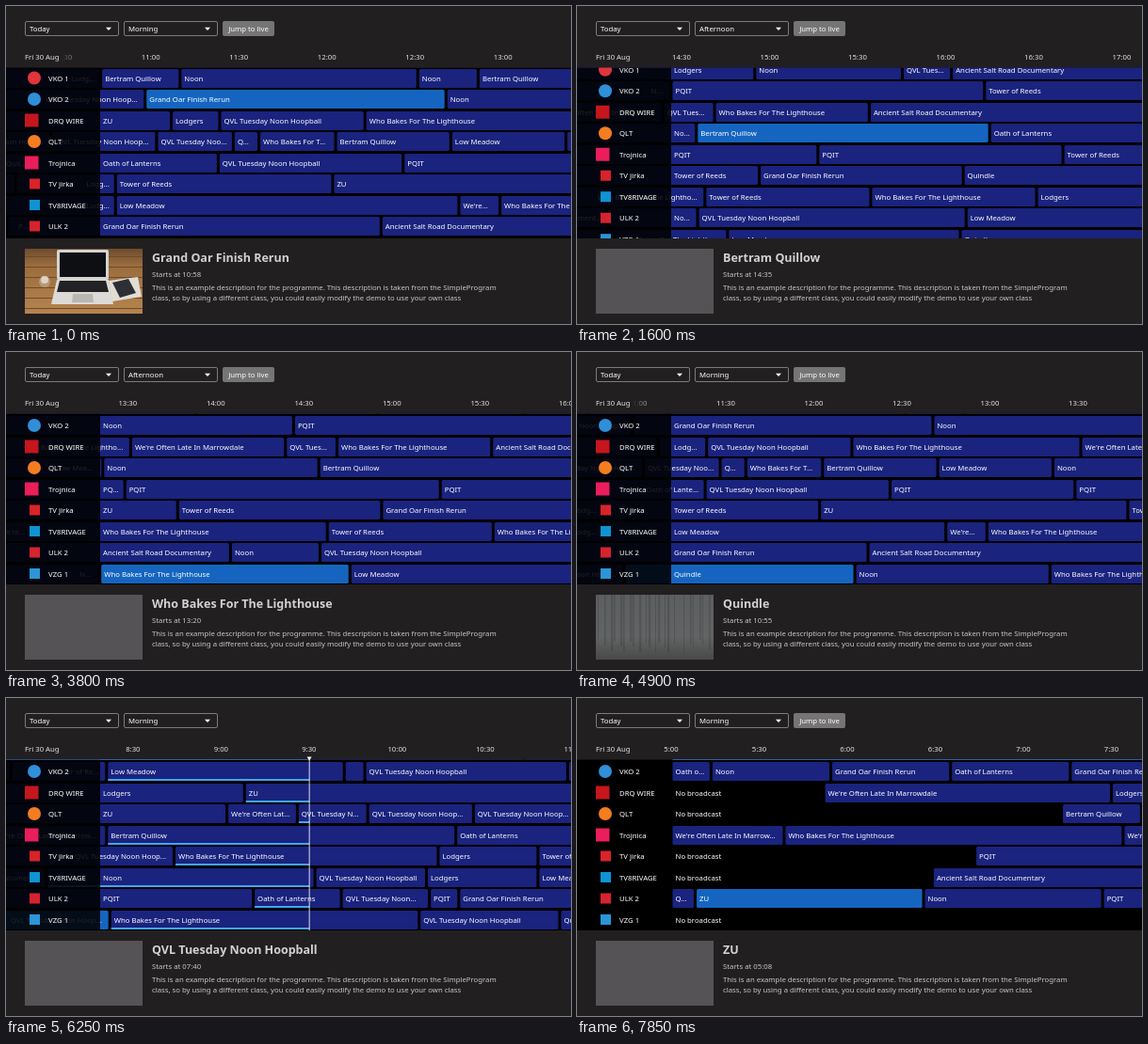
Write an HTML page with a canvas that moves like this. It is 600 by 338 pixels and loops after 8 s.

```html
<!DOCTYPE html>
<html lang="en">
<head>
<meta charset="utf-8">
<title>Programme guide</title>
<style>
html, body { margin: 0; width: 100%; height: 100%; overflow: hidden; background: #221f21; }
canvas { display: block; width: 600px; height: 338px; }
</style>
</head>
<body>
<canvas id="guide"></canvas>
<script>
const canvas = document.getElementById('guide');
const ctx = canvas.getContext('2d');
const dpr = window.devicePixelRatio || 1;
canvas.width = 600 * dpr;
canvas.height = 338 * dpr;

const LOOP = 8000, GLIDE = 600, SCALE = 187 / 60, LEFT = 100, TOP = 65.5, BOTTOM = 247;
const PITCH = 22.5, LIVE = 570.1, DAY_END = 1080, BG = '#221f21', SOFT = '#c8c8c8';
const FAMILY = '"Noto Sans", "Open Sans", sans-serif';
const FONT = '7.75px ' + FAMILY;

const NAMES = {
  s: 'Bertram Quillow', n: 'Noon', c: 'Grand Oar Finish Rerun', f: 'Lodgers',
  l: 'QVL Tuesday Noon Hoopball', m: 'Who Bakes For The Lighthouse', p: 'Low Meadow',
  t: 'Oath of Lanterns', i: 'PQIT', h: 'Tower of Reeds', w: 'Ancient Salt Road Documentary',
  a: "We're Often Late In Marrowdale", d: 'Quindle', e: 'ZU', x: 'No broadcast'
};

// A start minute followed by the shows that share the time up to the next one;
// a capital letter takes three times the share of a small one.
function schedule(plan) {
  const blocks = plan.split(' ').map(b => [parseFloat(b), b.replace(/[\d.]/g, '')]);
  return blocks.flatMap(([from, keys], i) => {
    const until = i + 1 < blocks.length ? blocks[i + 1][0] : DAY_END;
    const weights = [...keys].map(k => k < 'a' ? 3 : 1);
    const unit = (until - from) / weights.reduce((a, b) => a + b);
    let at = from;
    return weights.map((w, j) => {
      const start = at;
      at += w * unit;
      return { key: keys[j].toLowerCase(), start, end: at };
    });
  });
}

const CHANNELS = [
  ['VKO 1', 'circle', '#e0353a', '300f 643sN 751nSF 895Nl 962w'],
  ['VKO 2', 'circle', '#2f8fd8', '300tNCT 436ch 501p 582f 589l 658.1c 760.6n 866.5ih'],
  ['DRQ WIRE', 'big', '#c4161c', '300x 352af 548e 667fL 733m 811AlM 934w'],
  ['QLT', 'circle', '#f47d20', '300x 433sE 542al 590ll 662LlM 723sp 801.5n 875.1s 975tt'],
  ['Trojnica', 'big', '#e91e5a', '300aM 454a 501s 620tli 809i 916.5i 1000h'],
  ['TV jirka', 'small', '#d8232a', '300x 403.5il 524m 614f 648h 722e 827hc 966d'],
  ['TV8RIVAGE', 'small', '#1093d4', '300x 389wn 572lf 648p 765a 779m 878hm 991f'],
  ['ULK 2', 'small', '#d5232f', '300l 308.2e 386n 447i 551TLi 621c 738.5w 845nL 967p'],
  ['VZG 1', 'small', '#2a96d8', '300x 460l 502.1m 607.5l 655.4d 734n 800.5m 885.7p 965d']
].map(([name, logo, color, plan]) => ({ name, logo, color, shows: schedule(plan) }));

const KEYS = {
  right: [178, 850],
  down: [1250, 1540, 2100, 2350, 2500, 2600, 3050],
  left: [3270, 4110, 4654, 5130, 5620, 6235, 6700],
  up: [7800]
};

const clamp = v => Math.max(0, Math.min(1, v));
const easeOut = v => 1 - Math.pow(1 - clamp(v), 3);
const airing = (row, minute) => CHANNELS[row].shows.findIndex(s => s.start <= minute && s.end > minute);
const showOf = s => CHANNELS[s.row].shows[s.index];
const viewAt = (s, t) => s.from + (s.to - s.from) * easeOut((t - s.glide) / GLIDE);

// Left and right glide to the next show's start; up and down stay near the view's first third.
function buildStates() {
  let s = { time: 0, glide: 0, row: 1, index: airing(1, 700), from: 642.7 };
  s.to = showOf(s).start;
  const states = [s];
  const presses = Object.keys(KEYS).flatMap(dir => KEYS[dir].map(time => ({ dir, time })));
  presses.sort((a, b) => a.time - b.time);
  for (const { dir, time } of presses) {
    const next = { ...s, time };
    if (dir === 'up' || dir === 'down') {
      next.row += dir === 'up' ? -1 : 1;
      next.index = airing(next.row, s.to + 33);
    } else {
      next.index += dir === 'left' ? -1 : 1;
      next.from = viewAt(s, time);
      next.to = showOf(next).start;
      next.glide = time;
    }
    states.push(s = next);
  }
  return states;
}
const STATES = buildStates();

function rect(x, y, w, h, fill) {
  ctx.fillStyle = fill;
  ctx.fillRect(x, y, w, h);
}

function round(x, y, w, h, r, fill) {
  ctx.beginPath();
  ctx.roundRect(x, y, w, h, r);
  ctx.fillStyle = fill;
  ctx.fill();
}

function poly(fill, ...pts) {
  ctx.beginPath();
  for (let i = 0; i < pts.length; i += 2) ctx.lineTo(pts[i], pts[i + 1]);
  ctx.fillStyle = fill;
  ctx.fill();
}

function circle(x, y, r, fill) {
  ctx.beginPath();
  ctx.arc(x, y, r, 0, Math.PI * 2);
  ctx.fillStyle = fill;
  ctx.fill();
}

function text(s, x, y, color = '#fff', align = 'left', font = FONT) {
  ctx.font = font;
  ctx.fillStyle = color;
  ctx.textAlign = align;
  ctx.fillText(s, x, y);
}

function fit(s, room) {
  if (ctx.measureText(s).width <= room) return s;
  if (room < 12) return '';
  while (s && ctx.measureText(s + '...').width > room) s = s.slice(0, -1);
  return s.trimEnd() + '...';
}

const two = v => String(Math.floor(v)).padStart(2, '0');
const clock = min => Math.floor(min / 60) + ':' + two(min % 60);

function dropdown(x, label) {
  ctx.beginPath();
  ctx.roundRect(x + .5, 16.5, 99, 15, 1.5);
  ctx.strokeStyle = '#7d7b7d';
  ctx.lineWidth = 1;
  ctx.stroke();
  text(label, x + 5, 27);
  poly('#fff', x + 86, 22.7, x + 92, 22.7, x + 89, 26);
}

function drawHeader(now, liveX) {
  for (let m = Math.ceil((now - 40) / 30) * 30; m < now + 175; m += 30)
    text(clock(m), LEFT + (m - now) * SCALE, 57, '#e4e4e4', 'center');
  const fade = ctx.createLinearGradient(58, 0, 82, 0);
  fade.addColorStop(0, BG);
  fade.addColorStop(1, 'rgba(34,31,33,0)');
  rect(0, 46, 82, 16, fade);
  text('Fri 30 Aug', 20, 57, '#e4e4e4');
  dropdown(20, 'Today');
  dropdown(125, now < 720 ? 'Morning' : 'Afternoon');
  if (liveX < LEFT || liveX > 600) {
    round(230, 16, 55, 16, 2, '#757575');
    text('Jump to live', 257.5, 27, '#fff', 'center');
  }
}

function drawShow(show, y, now, focused) {
  const l = LEFT + (show.start - now) * SCALE + 1.5;
  const r = LEFT + (show.end - now) * SCALE - 1.5;
  if (r < -5 || l > 600) return;
  const name = NAMES[show.key], top = Math.round(y - 10);
  ctx.font = FONT;
  if (show.key !== 'x') round(l, top, r - l, 20, 1.5, focused ? '#1565c0' : '#1a237e');
  if (show.start < LIVE && show.end > LIVE)
    rect(l, top + 18, (LIVE - show.start) * SCALE - 1.5, 2, '#42a5f5');
  // the label stays beside the channel column until its show runs out
  const x = Math.max(l + 3, Math.min(103, r - ctx.measureText(name).width));
  text(fit(name, r - x - 5), x, top + 12.8);
}

function drawLogo(ch, y) {
  if (ch.logo === 'circle') circle(30, y, 7, ch.color);
  else if (ch.logo === 'big') rect(20, y - 7, 14.5, 14, ch.color);
  else rect(25, y - 5.5, 11, 11, ch.color);
}

function drawGrid(t, now, focus, liveX) {
  const shift = 21 * easeOut((t - 1540) / 370);
  const rowY = i => 76.5 + i * PITCH - shift;
  const height = BOTTOM - TOP;
  ctx.save();
  ctx.beginPath();
  ctx.rect(0, TOP, 600, height);
  ctx.clip();
  rect(0, TOP, 600, height, '#000');
  CHANNELS.forEach((ch, i) => ch.shows.forEach(s => drawShow(s, rowY(i), now, s === focus)));
  rect(0, TOP, LEFT, height, 'rgba(0,0,0,.87)');
  CHANNELS.forEach((ch, i) => {
    drawLogo(ch, rowY(i));
    text(ch.name, 45, Math.round(rowY(i) - 10) + 12.8);
  });
  ctx.restore();
  if (liveX >= LEFT && liveX <= 600) {
    rect(liveX - .5, TOP, 1, height, 'rgba(255,255,255,.85)');
    poly('#fff', liveX - 2.5, 62.5, liveX + 2.5, 62.5, liveX, 66.5);
  }
}

function drawDesk() {
  const wood = ctx.createLinearGradient(0, 258, 0, 327);
  wood.addColorStop(0, '#6d4c2e');
  wood.addColorStop(.25, '#9a6c3d');
  wood.addColorStop(1, '#b58450');
  rect(20, 258, 125, 69, wood);
  for (let i = 0; i < 6; i++) rect(20, 266 + i * 11, 125, 1, '#6f4a28');
  round(54, 259, 55, 32, 2, '#d4d4d4');
  rect(57, 262, 49, 26, '#0e0f12');
  poly('#dcdad6', 54, 291, 109, 291, 114, 317, 48, 317);
  poly('#222224', 57, 292, 106, 292, 109, 304, 54, 304);
  poly('#bab7b2', 71, 306, 92, 306, 93, 315, 70, 315);
  circle(41, 293, 6, '#b59a78');
  circle(41, 291, 4, '#ded2c2');
  poly('#e2ddd3', 109, 292, 140, 288, 144, 309, 113, 314);
  poly('#2c2f35', 113, 294, 130, 290, 138, 305, 121, 310);
}

function drawForest(alpha) {
  ctx.save();
  ctx.globalAlpha = alpha;
  const fog = ctx.createLinearGradient(0, 258, 0, 327);
  fog.addColorStop(0, '#5f6263');
  fog.addColorStop(.65, '#666868');
  fog.addColorStop(1, '#454646');
  rect(20, 258, 125, 69, fog);
  for (let i = 0; i < 22; i++)
    rect(22 + i * 37 % 121, 258, 1 + i % 3 * .6, 48 + i * 7 % 16, 'rgba(55,58,58,.45)');
  ctx.restore();
}

function drawInfo(t, show) {
  rect(20, 258, 125, 69, '#555355');
  if (t < KEYS.right[0]) drawDesk();
  if (show.key === 'd') drawForest(clamp((t - 4700) / 260));
  text(NAMES[show.key], 155, 272, '#d2d2d2', 'left', 'bold 12.5px ' + FAMILY);
  text('Starts at ' + two(show.start / 60) + ':' + two(show.start % 60), 155, 288, SOFT);
  text('This is an example description for the programme. This description is taken from the SimpleProgram', 155, 302, SOFT);
  text('class, so by using a different class, you could easily modify the demo to use your own class', 155, 313, SOFT);
}

function draw(t) {
  ctx.setTransform(dpr, 0, 0, dpr, 0, 0);
  rect(0, 0, 600, 338, BG);
  const state = STATES.filter(s => s.time <= t).pop();
  const now = viewAt(state, t);
  const liveX = LEFT + (LIVE - now) * SCALE;
  drawHeader(now, liveX);
  drawGrid(t, now, showOf(state), liveX);
  drawInfo(t, showOf(state));
}

const begin = performance.now();
function tick() {
  draw((performance.now() - begin) % LOOP);
  requestAnimationFrame(tick);
}
tick();
</script>
</body>
</html>
```
